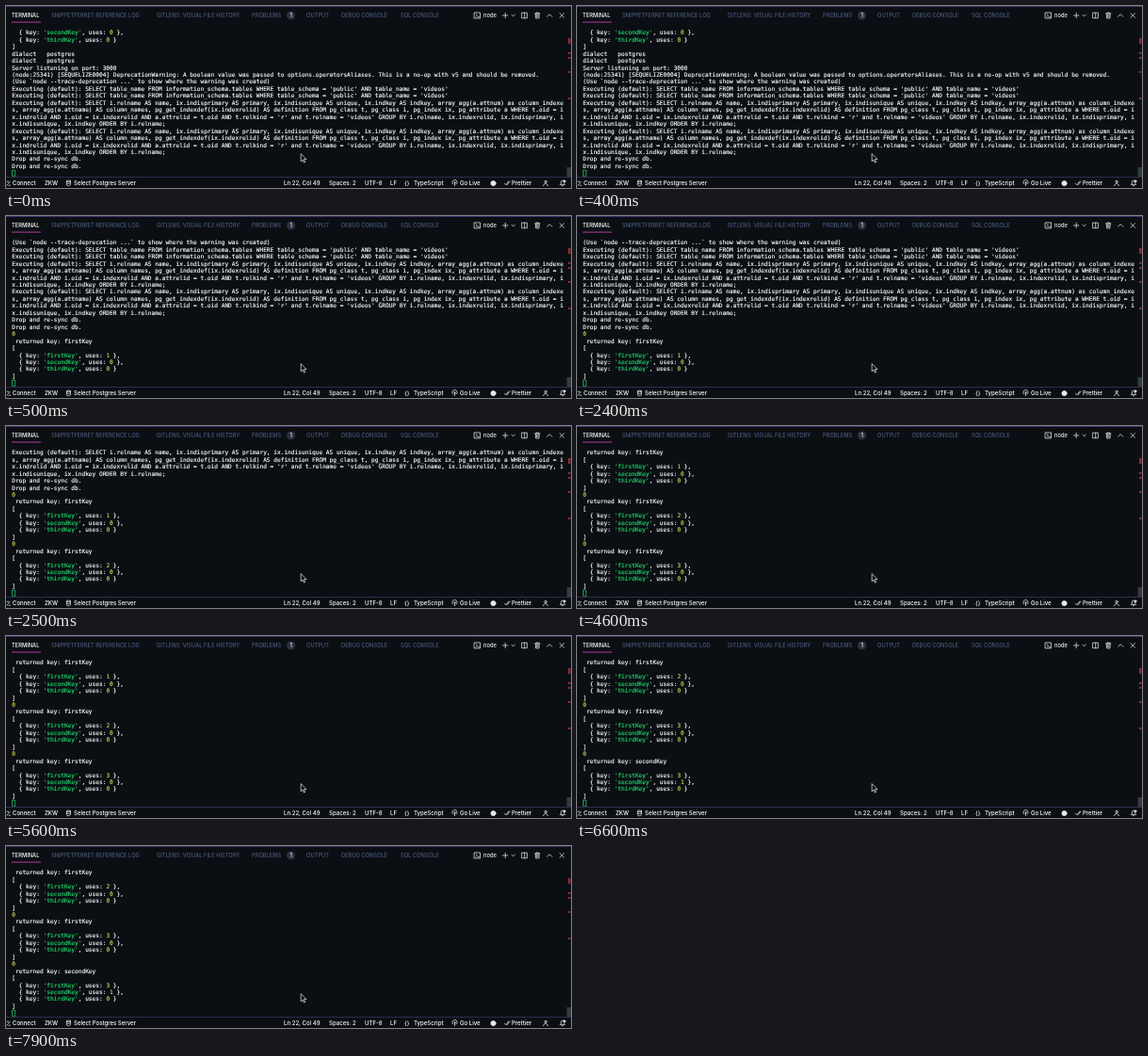
An HTML page for the animation above (8 s loop, 600x193 px).

```html
<!DOCTYPE html>
<html lang="en">
<head>
<meta charset="utf-8">
<title>Terminal</title>
<style>
html, body { margin: 0; width: 100%; height: 100%; overflow: hidden; background: #0b0f13; }
svg { display: block; width: 100vw; height: 100vh; }
text { white-space: pre; }
.term { font: 6.17px "DejaVu Sans Mono", monospace; fill: #fff; stroke: #fff; stroke-width: .14; }
.tab { font: 500 5.75px Inter, sans-serif; fill: #4a587c; }
.bar { font: 500 6.05px Inter, sans-serif; fill: #fff; }
.str { fill: #22da6e; stroke: #22da6e; }
.num { fill: #d3dc50; stroke: #d3dc50; }
.icon { fill: none; stroke: #e6eaee; stroke-width: .75; stroke-linecap: round; stroke-linejoin: round; }
</style>
</head>
<body>
<svg viewBox="0 0 600 193" preserveAspectRatio="none">
  <rect width="600" height="193" fill="#0b0f13"/>
  <rect width="600" height="1" fill="#43356e"/>
  <rect y="181" width="600" height="1" fill="#33294f"/>
  <g id="tabs" class="tab"></g>
  <rect x="6" y="16.6" width="31" height="1" fill="#b23a9e"/>
  <circle cx="302.6" cy="10" r="4.5" fill="#2b3342"/>
  <text x="302.6" y="12.1" text-anchor="middle" class="tab" style="fill:#fff">1</text>
  <g class="icon">
    <path d="M497.5 7h6v6h-6zM499 8.6l1.5 1.4-1.5 1.4M501 11.6h1.3"/>
    <path d="M527.5 10h5.4M530.2 7.3v5.4"/>
    <path d="M537 9.2l1.7 1.7 1.7-1.7"/>
    <path d="M548 7.2h5.4v5.6H548zM550.7 7.2v5.6"/>
    <path d="M561.7 8h5.2M563.3 8v-1h2v1M562.3 8l.3 5h3.4l.3-5M563.7 9.4v2.3M564.9 9.4v2.3"/>
    <path d="M574.6 11.3l2.6-2.6 2.6 2.6"/>
    <path d="M588 7.7l4.6 4.6M592.6 7.7l-4.6 4.6"/>
  </g>
  <g id="rows" class="term"></g>
  <rect x="6.6" y="174.2" width="3.2" height="6" fill="none" stroke="#22b860" stroke-width=".8"/>
  <rect x="595.5" y="171" width="4.5" height="10" fill="#343a41"/>
  <g id="marks" fill="#8e2a33"></g>
  <g id="status" class="bar"></g>
  <g class="icon">
    <path d="M1 190.2l3.2-4M1 186.2h1.6M3 190.2h1.6"/>
    <ellipse cx="66.4" cy="185.8" rx="2" ry=".8"/>
    <path d="M64.4 185.8v4c0 1.1 4 1.1 4 0v-4M64.4 187.8c0 1.1 4 1.1 4 0"/>
    <circle cx="476.5" cy="187.2" r=".6"/>
    <path d="M474.8 189a2.6 2.6 0 1 1 3.4 0M476.5 188v2.5"/>
    <circle cx="517.5" cy="188" r="2.6" fill="#e6eaee"/>
    <path d="M529.4 188.2l1.5 1.6 2.8-3.8M532.2 189.6l2.8-3.6"/>
    <circle cx="573" cy="186.4" r="1.2"/>
    <path d="M570.6 190.6c.2-3 4.6-3 4.8 0"/>
    <path d="M588.6 189.4h5l-.8-1.2v-1.4a1.7 1.7 0 0 0-3.4 0v1.4zM590.6 190.6h1"/>
    <circle cx="593" cy="185.8" r="1" fill="#e6eaee"/>
  </g>
  <path d="M313.2 156.6v8.2l1.9-1.7 1.3 3 1.3-.6-1.3-2.9h2.6z" fill="#000" stroke="#fff" stroke-width=".7"/>
</svg>
<script>
const LOOP = 8000, COLS = 158, ROWS = 20;
const TOP = 30.3, LEAD = 7.45;
const CALLS = [500, 2500, 4500, 6500];
const KEYS = ['firstKey', 'secondKey', 'thirdKey'];
const PICKS = [0, 0, 0, 1];
const el = id => document.getElementById(id);

const uses = [0, 0, 0];
const list = () => KEYS.map((k, i) => `  { key: '${k}', uses: ${uses[i]} }${i < 2 ? ',' : ''}`);

const tableQuery = "Executing (default): SELECT table_name FROM information_schema.tables " +
  "WHERE table_schema = 'public' AND table_name = 'videos'";
const indexQuery = "Executing (default): SELECT i.relname AS name, ix.indisprimary AS primary, " +
  "ix.indisunique AS unique, ix.indkey AS indkey, array_agg(a.attnum) as column_indexes, " +
  "array_agg(a.attname) AS column_names, pg_get_indexdef(ix.indexrelid) AS definition " +
  "FROM pg_class t, pg_class i, pg_index ix, pg_attribute a WHERE t.oid = ix.indrelid " +
  "AND i.oid = ix.indexrelid AND a.attrelid = t.oid AND t.relkind = 'r' and t.relname = 'videos' " +
  "GROUP BY i.relname, ix.indexrelid, ix.indisprimary, ix.indisunique, ix.indkey ORDER BY i.relname;";
const wrap = s => s.match(new RegExp(`.{1,${COLS}}`, 'g'));

const log = [
  ...list().slice(1), ']',
  'dialect   postgres', 'dialect   postgres',
  'Server listening on port: 3000',
  '(node:25341) [SEQUELIZE0004] DeprecationWarning: A boolean value was passed to ' +
    'options.operatorsAliases. This is a no-op with v5 and should be removed.',
  '(Use `node --trace-deprecation ...` to show where the warning was created)',
  tableQuery, tableQuery,
  ...wrap(indexQuery), ...wrap(indexQuery),
  'Drop and re-sync db.', 'Drop and re-sync db.'
];
const ends = [log.length];
for (const p of PICKS) {
  uses[p]++;
  log.push('0', ` returned key: ${KEYS[p]}`, '[', ...list(), ']');
  ends.push(log.length);
}

function paint(line) {
  if (line === '0') return '<tspan class="num">0</tspan>';
  if (!line.startsWith('  {')) return line;
  return line.replace(/('\w+')(, uses: )(\d)/,
    '<tspan class="str">$1</tspan>$2<tspan class="num">$3</tspan>');
}

const label = y => ([x, s, fill]) =>
  `<text x="${x}" y="${y}"${fill ? ` style="fill:${fill}"` : ''}>${s}</text>`;

el('tabs').innerHTML = [
  [6, 'TERMINAL', '#fff'], [48, 'SNIPPETFERRET REFERENCE LOG'],
  [160, 'GITLENS: VISUAL FILE HISTORY'], [261, 'PROBLEMS'], [319, 'OUTPUT'],
  [356, 'DEBUG CONSOLE'], [419, 'SQL CONSOLE'], [507, 'node', '#f0f2f5']
].map(label(12.1)).join('');

el('status').innerHTML = [
  [7, 'Connect'], [41, 'ZKW'], [72, 'Select Postgres Server'], [295, 'Ln 22, Col 49'],
  [343, 'Spaces: 2'], [381, 'UTF-8'], [408, 'LF'], [423, '{}'], [433, 'TypeScript'],
  [482, 'Go Live'], [537, 'Prettier']
].map(label(190.2)).join('');

el('marks').innerHTML = [[34, 6], [49, 2], [54, 2], [69, 2], [97, 2]]
  .map(([y, h]) => `<rect x="597" y="${y}" width="2.5" height="${h}"/>`).join('');

let shown = -1;
function draw(t) {
  const step = CALLS.filter(c => t >= c).length;
  if (step === shown) return;
  shown = step;
  const end = ends[step];
  el('rows').innerHTML = log.slice(end - ROWS, end)
    .map((s, i) => label(TOP + i * LEAD)([6.3, paint(s)])).join('');
}

const start = performance.now();
function tick() {
  draw((performance.now() - start) % LOOP);
  requestAnimationFrame(tick);
}
tick();
</script>
</body>
</html>
```
